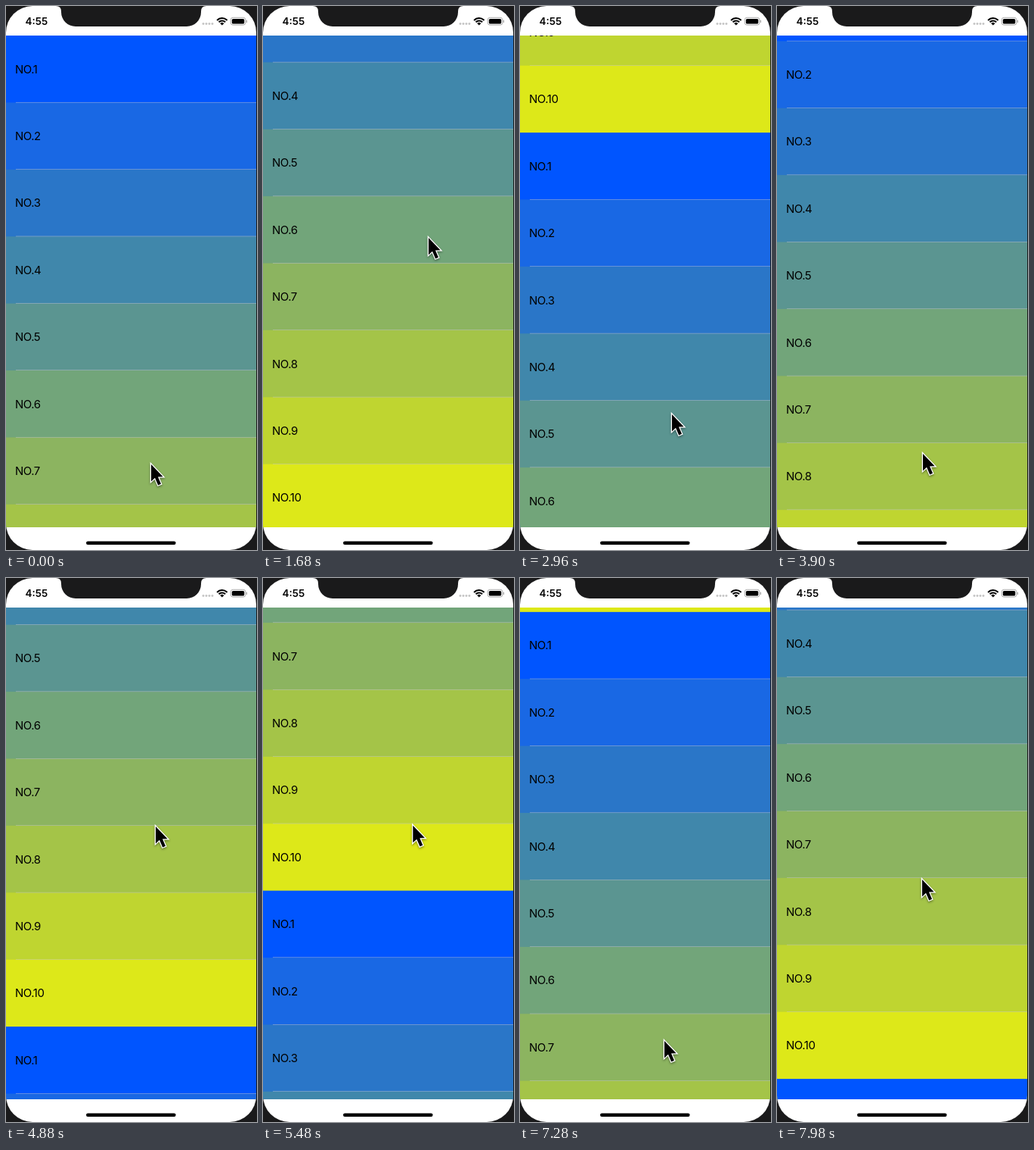
An HTML page with a canvas for the animation above (8 s loop, 332x718 px).

```html
<!DOCTYPE html>
<html lang="en">
<head>
<meta charset="utf-8">
<title>Endless list</title>
<style>
  html, body { margin: 0; width: 100%; height: 100%; overflow: hidden; background: #1a1a1b; }
  canvas { display: block; }
</style>
</head>
<body>
<canvas id="stage" width="332" height="718"></canvas>
<script>
const ctx = document.getElementById('stage').getContext('2d');
const LOOP = 8000;
const BEZEL = '#1a1a1b';
const LIST = { top: 39, bottom: 688, width: 331, row: 88.4 };
const COLORS = ['#0055ff', '#1968e4', '#2a76c8', '#4087ab', '#5b9591',
                '#72a57a', '#8cb460', '#a4c448', '#bfd530', '#dde819'];

// Keys: [step, value(s)..., bend]; the bend shapes the way to the next key:
// above 0 slows down, below 0 speeds up, 0 is linear.
const SCROLL = [
  [35, 0, 0], [37, 229.9, .63], [65, 755.9, .43], [84, 965.1, 0], [98, 965.1, -1],
  [105, 1214.9, .32], [134, 1558.2, .35], [166, 1829, -.8], [172, 2029.9, 0]
];
const CURSOR = [
  [1, 191, 604, 0], [28, 191, 604, -1], [35, 197, 540, 0], [37, 218, 305, 1.5],
  [42, 219, 285, 0], [55, 219, 285, 0], [65, 200, 538, 1.5], [84, 192, 590, 0],
  [98, 192, 590, -1], [105, 197, 327, 1.5], [109, 198, 300, 0], [118, 198, 300, 0],
  [130, 190, 610, 0], [166, 190, 610, -.8], [172, 191, 397, 0]
];

// Pictures last 20, 20 and 100 ms in turn, while motion advances evenly per picture.
function stepAt(ms) {
  const shifted = ms + 20;
  return Math.floor(shifted / 140) * 3 + Math.min(2, Math.floor(shifted % 140 / 20));
}

function sample(keys, step) {
  if (step <= keys[0][0]) return keys[0].slice(1, -1);
  const i = keys.findIndex(key => key[0] >= step);
  if (i < 0) return keys[keys.length - 1].slice(1, -1);
  const from = keys[i - 1], to = keys[i], bend = from[from.length - 1];
  const x = (step - from[0]) / (to[0] - from[0]);
  const f = bend ? (1 - Math.exp(-bend * x)) / (1 - Math.exp(-bend)) : x;
  return from.slice(1, -1).map((v, j) => v + (to[j + 1] - v) * f);
}

function pill(x, y, w, h, r, color) {
  ctx.fillStyle = color;
  ctx.beginPath();
  ctx.roundRect(x, y, w, h, r);
  ctx.fill();
}

function drawList(scroll) {
  const { top, bottom, width, row } = LIST;
  ctx.save();
  ctx.beginPath();
  ctx.rect(0, top, width, bottom - top);
  ctx.clip();
  ctx.font = '15px Inter, sans-serif';
  ctx.letterSpacing = '-0.45px';
  for (let i = Math.floor(scroll / row); ; i++) {
    const y = top + i * row - scroll;
    if (y >= bottom) break;
    ctx.fillStyle = COLORS[i % 10];
    ctx.fillRect(0, y, width, bottom - y);
    if (i % 10) {
      ctx.fillStyle = '#c8c7cc';
      ctx.fillRect(13, y - .44, width - 13, .44);
    }
    ctx.fillStyle = '#000';
    ctx.fillText('NO.' + (i % 10 + 1), 12, y + row / 2 + 5.4);
  }
  ctx.restore();
}

function drawNotch() {
  ctx.fillStyle = BEZEL;
  ctx.beginPath();
  ctx.moveTo(66, 0);
  ctx.quadraticCurveTo(73, 0, 73, 7);
  ctx.arcTo(73, 27, 93, 27, 19);
  ctx.arcTo(258, 27, 258, 7, 19);
  ctx.lineTo(258, 7);
  ctx.quadraticCurveTo(258, 0, 265, 0);
  ctx.fill();
}

function drawStatusBar() {
  ctx.fillStyle = '#000';
  ctx.font = '600 13.4px Inter, sans-serif';
  ctx.letterSpacing = '0px';
  ctx.textAlign = 'center';
  ctx.fillText('4:55', 40.3, 25);
  ctx.textAlign = 'left';

  for (let i = 0; i < 4; i++) pill(259.5 + i * 4, 22, 2.9, 2.9, 1.3, '#c6c6c6');

  // Wi-Fi: two arcs above a small wedge
  ctx.strokeStyle = ctx.fillStyle = '#000';
  ctx.lineWidth = 2;
  for (const r of [9.2, 5.9]) {
    ctx.beginPath();
    ctx.arc(285.8, 25.3, r, -Math.PI * .76, -Math.PI * .24);
    ctx.stroke();
  }
  ctx.beginPath();
  ctx.moveTo(285.8, 25.5);
  ctx.arc(285.8, 25.5, 3.6, -Math.PI * .76, -Math.PI * .24);
  ctx.fill();

  ctx.strokeStyle = '#a3a3a3';
  ctx.lineWidth = .9;
  ctx.beginPath();
  ctx.roundRect(297.2, 15.3, 19.6, 9.8, 3);
  ctx.stroke();
  pill(298.8, 16.9, 16.4, 6.6, 1.6, '#000');
  pill(317.7, 18.6, 1.2, 3.4, .6, '#a3a3a3');
}

function drawCursor(x, y) {
  ctx.save();
  ctx.translate(x, y);
  ctx.beginPath();
  for (const [px, py] of [[1, 1], [1, 23.4], [6, 18.8], [10.2, 28.4],
                          [14, 26.8], [10, 17.4], [16.6, 17.2]]) ctx.lineTo(px, py);
  ctx.closePath();
  ctx.shadowColor = 'rgba(0,0,0,.4)';
  ctx.shadowBlur = 3;
  ctx.shadowOffsetY = 1.5;
  ctx.lineWidth = 2.6;
  ctx.strokeStyle = '#fff';
  ctx.stroke();
  ctx.shadowColor = 'transparent';
  ctx.fillStyle = '#000';
  ctx.fill();
  ctx.restore();
}

function draw(ms) {
  const step = stepAt(ms);
  ctx.fillStyle = BEZEL;
  ctx.fillRect(0, 0, 332, 718);
  ctx.save();
  ctx.beginPath();
  ctx.roundRect(0, 0, 331, 718, 35);
  ctx.clip();
  ctx.fillStyle = '#fff';
  ctx.fillRect(0, 0, 332, 718);
  drawList(sample(SCROLL, step)[0]);
  ctx.restore();
  drawNotch();
  drawStatusBar();
  pill(106, 706.6, 118.6, 4.4, 2.2, '#000');
  drawCursor(...sample(CURSOR, step));
}

const start = performance.now();
function tick() {
  draw((performance.now() - start) % LOOP);
  requestAnimationFrame(tick);
}
tick();
</script>
</body>
</html>
```
